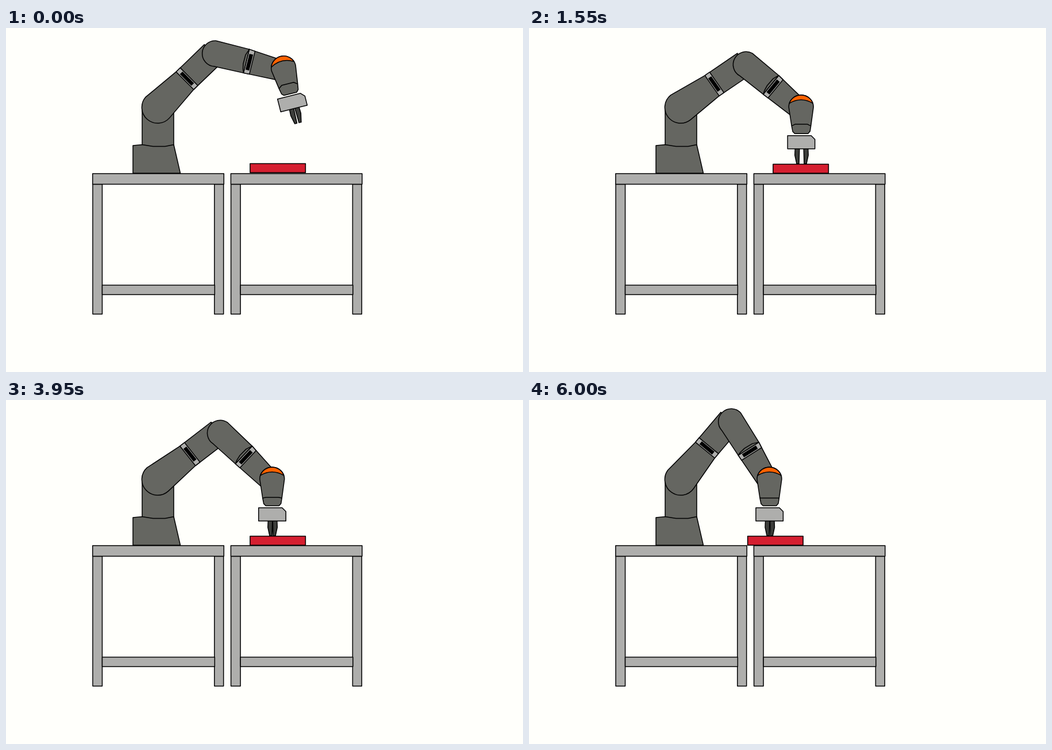
Write an HTML page that moves like this. It is 900 by 600 pixels and loops after 6.6 s.

```html
<!DOCTYPE html>
<html lang="en">
<head>
<meta charset="utf-8">
<title>Robot arm pulling a box</title>
<style>
  html, body { margin: 0; width: 100%; height: 100%; overflow: hidden; background: #fffffb; }
  svg { display: block; width: 900px; height: 600px; }
  .part { stroke: #000; stroke-width: 1.5; stroke-linejoin: round; }
  .dark { fill: #656661; }
  .light { fill: #aeaeac; }
  .slot { fill: #000; stroke: none; }
  .red { fill: #d51f30; }
  .orange { fill: #ff6200; }
  .finger { fill: #3d3e3b; }
</style>
</head>
<body>
<svg viewBox="0 0 900 600" xmlns="http://www.w3.org/2000/svg">
  <defs>
    <g id="table" class="part light">
      <path d="M151 272.5h16.5V499H151zM362.8 272.5h15.9V499h-15.9z"/>
      <path d="M167.5 448.5h195.8V465H167.5z"/>
      <path d="M150.8 254h228.5v18.5H150.8z"/>
    </g>
  </defs>
  <use href="#table"/>
  <use href="#table" x="240.6"/>

  <g class="part dark">
    <path d="M237 138V210H292V138z"/>
    <path d="M221 205L237 203.5L256 206.5H277L292 203.5L303.5 253.3H221z"/>
  </g>

  <g id="upper" class="part dark">
    <path d="M-2 -27.5L66.5 -21.5L135 -20.8V23L66.5 22L2 27.5A27.5 27.5 0 0 1 -2 -27.5z"/>
    <path class="light" d="M66.5 -21.5H76.5V22H66.5z"/>
    <path class="slot" d="M68.2 -14h6.6v28.5h-6.6z"/>
  </g>

  <g id="fore" class="part dark">
    <path d="M0 -21.6L60 -21L120 -16V19.5L60 21.5L8 22.6A22 22 0 0 1 0 -21.6z"/>
    <path class="light" d="M60 -21L70.5 -20V21.2L60 21.5z"/>
    <path d="M60 -21L56 -10L55.7 6L57.5 15L60 21.5z"/>
    <path class="slot" d="M62 -13.5h6.6v28.5h-6.6z"/>
  </g>

  <g id="hand" class="part">
    <path id="left" class="finger" d="M-7.5 71L-8 84L-4.8 99H-.8L0 71z"/>
    <path id="right" class="finger" d="M7.5 71L8 84L4.8 99H.8L0 71z"/>
    <path class="light" d="M-23.5 50H17.5L24 56.5V73H-23.5z"/>
    <path class="dark" d="M-21.5 0A21.5 21 0 0 1 21.5 0L17 33L15.5 42.5L12 46.5H-11L-14.5 43L-16.5 33z"/>
    <path class="orange" d="M-20.4 -6.5A21.5 21 0 0 1 20.4 -6.5Q0 -18.5 -20.4 -6.5z"/>
    <path id="seam" fill="none"/>
  </g>

  <path id="box" class="part red" d="M0 0h96.5v15.8H0z"/>
</svg>
<script>
const LOOP = 6600, STEP = 50;
const SHOULDER = { x: 264, y: 138.5 };
const UPPER = 135.5, FORE = 127.6, PIVOT = 4;
const $ = id => document.getElementById(id);

// Progress from 0 to 1 between two times, linear and smoothed.
const ramp = (t, from, to) => Math.min(1, Math.max(0, (t - from) / (to - from)));
const ease = (t, from, to) => { const p = ramp(t, from, to); return p * p * (3 - 2 * p); };

const move = (id, x, y, angle = 0) =>
  $(id).setAttribute("transform", `translate(${x} ${y}) rotate(${angle})`);
const degrees = (dx, dy) => Math.atan2(dy, dx) * 180 / Math.PI;

function elbowFor(px, py) {
  const dx = px - SHOULDER.x, dy = py - SHOULDER.y, d = Math.hypot(dx, dy);
  const along = (d * d + UPPER * UPPER - FORE * FORE) / (2 * d);
  const up = Math.sqrt(UPPER * UPPER - along * along);
  return {
    x: SHOULDER.x + (dx * along + dy * up) / d,
    y: SHOULDER.y + (dy * along - dx * up) / d
  };
}

function pose(t) {
  const lower = ramp(t, 300, 1600), open = ease(t, 300, 900), close = ease(t, 1550, 3700);
  const settle = 1 / (1 + (Math.max(0, t - 300) / 1280) ** 4);
  const pull = ramp(t, 3500, 6000) ** 3;
  return {
    x: 463.2 + 20 * settle - 44.8 * pull,
    y: 138 - 68.2 * (1 - lower) ** 1.85,
    tilt: -14.2 * (1 - lower) ** 2 * Math.cos(5.6 * lower),
    grip: 1 + 2.7 * open - 3.5 * close,
    arch: 4.5 * (1 - open) + 3 * (ease(t, 900, 1550) - ease(t, 3100, 4600)),
    boxY: 236.5 + ramp(t, 300, 500)
  };
}

function draw(t) {
  const { x, y, tilt, grip, arch, boxY } = pose(t);
  const rad = tilt * Math.PI / 180;
  const px = x - PIVOT * Math.sin(rad), py = y + PIVOT * Math.cos(rad);
  const elbow = elbowFor(px, py);

  move("upper", SHOULDER.x, SHOULDER.y, degrees(elbow.x - SHOULDER.x, elbow.y - SHOULDER.y));
  move("fore", elbow.x, elbow.y, degrees(px - elbow.x, py - elbow.y));
  move("hand", x, y, tilt);
  move("left", 0.8 - grip, 0);
  move("right", 0.8 + grip, 0);
  $("seam").setAttribute("d", `M-16.5 33L-10.5 ${33 - arch}H11L17 33`);
  move("box", Math.min(424.9, x - 37.8), boxY);
}

const start = performance.now();
function tick() {
  const t = (performance.now() - start) % LOOP;
  draw(Math.floor(t / STEP) * STEP);
  requestAnimationFrame(tick);
}
draw(0);
requestAnimationFrame(tick);
</script>
</body>
</html>
```
